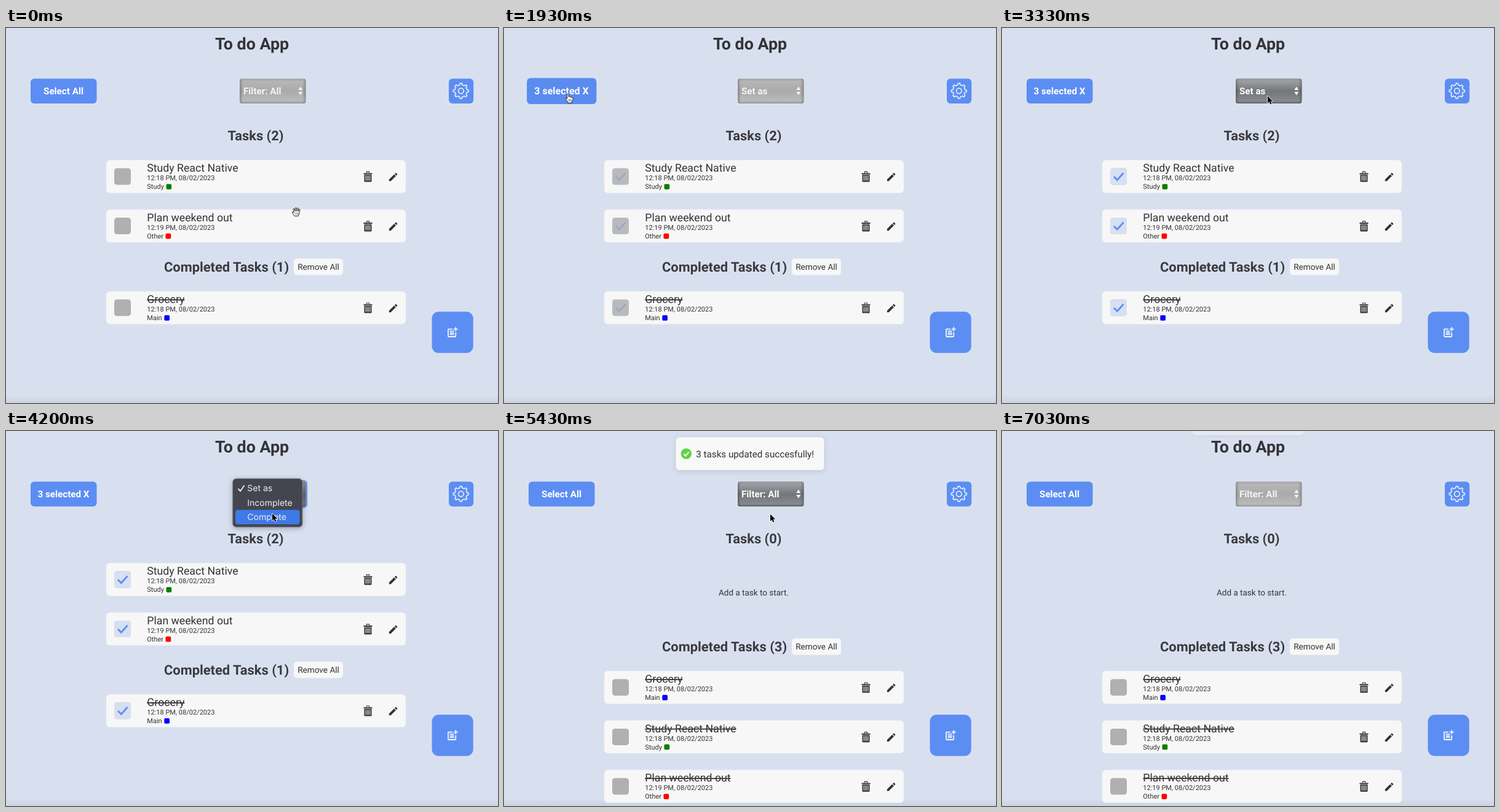
An HTML page for the animation above (7530 ms loop, 800 px wide and 611 px high).

```html
<!DOCTYPE html>
<html lang="en">
<head>
<meta charset="utf-8">
<title>To do App</title>
<style>
  html, body { margin: 0; width: 100%; height: 100%; overflow: hidden; background: #d8e0f0; }
  svg { display: block; width: 100vw; height: 100vh; }
  text { font-family: Roboto, sans-serif; fill: #333336; text-rendering: geometricPrecision; }
  .bold { font-weight: 700; }
  .heading { font-size: 21.9px; font-weight: 700; fill: #3a3a3e; }
  .mid { text-anchor: middle; }
  .name { font-size: 17.7px; }
  .small { font-size: 11px; }
  .button { font-size: 15.2px; font-weight: 700; fill: #fff; }
  .done { text-decoration: line-through; }
  .menu text { font: 14px Inter, sans-serif; fill: #ececf0; }
  .toast rect { filter: drop-shadow(0 2px 4px rgba(0, 0, 0, .12)); }
  .popup { filter: drop-shadow(0 2px 4px rgba(0, 0, 0, .3)); }
  .pointer path { stroke-linejoin: round; stroke-linecap: round; }
</style>
</head>
<body>
<svg id="stage" viewBox="0 0 800 611"></svg>
<script>
const LOOP = 7530, LAST_CHANGE = 7030;
const CLICK_ALL = 1900, LEAVE_ALL = 2585, OPEN = 3370, CHOOSE = 4570, UPDATE = 4950, TOAST_OUT = 6942;
const BLUE = '#5c8df2';

const clamp = v => Math.max(0, Math.min(1, v));
const lerp = (a, b, p) => a + (b - a) * p;
const ramp = (t, start, length) => clamp((t - start) / length);

function bezier(x1, y1, x2, y2) {
  const at = (a, b, u) => 3 * a * u * (1 - u) ** 2 + 3 * b * u * u * (1 - u) + u ** 3;
  return x => {
    if (x <= 0 || x >= 1) return clamp(x);
    let lo = 0, hi = 1;
    for (let i = 0; i < 24; i++) {
      const u = (lo + hi) / 2;
      if (at(x1, x2, u) < x) lo = u; else hi = u;
    }
    return at(y1, y2, lo);
  };
}
const ease = bezier(.25, .1, .25, 1);
const glide = bezier(.4, 0, .3, 1);
const toastIn = bezier(.21, 1.02, .73, 1);
const toastOut = bezier(.06, .71, .55, 1);
const pop = bezier(.175, .885, .32, 1.275);

// Icons
const trash = `<g transform="translate(581.5 18)" fill="#333">
  <path d="M0 3.2h14v2H0zM4.2 3V1.4Q4.2.4 5.2.4h3.6q1 0 1 1V3H8.6V1.6H5.4V3z"/>
  <path d="M1 6h12v10.4q0 1.2-1.2 1.2H2.2Q1 17.600 1 16.400z"/>
  <path d="M3.500 7.500v8M5.850 7.500v8M8.150 7.500v8M10.500 7.500v8" stroke="#f7f7f7" stroke-width="1"/></g>`;
const pencil = `<path transform="translate(620.6 18.600) scale(.75)" fill="#333"
  d="M3 17.25V21h3.75L17.81 9.94l-3.75-3.75zM20.71 7.04a1 1 0 000-1.41l-2.340-2.340a1 1 0 00-1.410 0l-1.830 1.830 3.750 3.750z"/>`;
const postAdd = `<path transform="translate(715.400 485.400) scale(.88)" fill="#fff" fill-opacity=".92"
  d="M17 19H5V7h7V5H5a2 2 0 00-2 2v12a2 2 0 002 2h12a2 2 0 002-2v-7h-2zM19 2h-2v3h-3v2h3v3h2V7h3V5h-3zM7 9h8v2H7zM7 12h8v2H7zM7 15h8v2H7z"/>`;

function gear() {
  const points = [];
  for (let i = 0; i < 8; i++) {
    for (const [turn, radius] of [[-.27, 10], [-.15, 12.5], [.15, 12.5], [.27, 10]]) {
      const a = (i + turn) * Math.PI / 4;
      points.push(`${(739.8 + radius * Math.sin(a)).toFixed(2)} ${(102.5 - radius * Math.cos(a)).toFixed(2)}`);
    }
  }
  return `<g fill="none" stroke="#e4ecfd" stroke-width="1.7" stroke-linejoin="round">
    <path d="M${points.join('L')}z"/><circle cx="739.800" cy="102.500" r="4.300"/></g>`;
}

// Page parts
const tasks = {
  study: ['Study React Native', '12:18 PM, 08/02/2023', 'Study', 'green', 260.5],
  plan: ['Plan weekend out', '12:19 PM, 08/02/2023', 'Other', 'red', 259.5],
  grocery: ['Grocery', '12:18 PM, 08/02/2023', 'Main', 'blue', 257.3]
};

function card(y, [name, time, tag, color, dotX], done) {
  return `<g transform="translate(0 ${y})">
    <rect x="163" width="487" height="53.500" rx="6" fill="#f7f7f7"/>
    <rect x="176" y="13.300" width="27" height="27" rx="4.500" fill="#b0b0b0"/>
    <g class="tick" opacity="0"><rect x="176" y="13.300" width="27" height="27" rx="4.500" fill="#d7e0f2"/>
      <path d="M182 27l5.300 5.500 10.200-11.500" fill="none" stroke="${BLUE}" stroke-width="2.800"/></g>
    <text class="name ${done ? 'done' : ''}" x="229.300" y="19">${name}</text>
    <text class="small" x="229.300" y="33.300">${time}</text>
    <text class="small" x="229.300" y="47.200">${tag}</text>
    <rect x="${dotX}" y="39" width="8.700" height="8.700" rx="1.800" fill="${color}"/>
    ${trash}${pencil}</g>`;
}

function completedHeading(y, count) {
  return `<g transform="translate(0 ${y})">
    <text class="heading" x="257" y="7.600">Completed Tasks (${count})</text>
    <rect x="468" y="-13.600" width="80" height="26.800" rx="5" fill="#f7f7f7"/>
    <text class="mid" x="508" y="4.500" font-size="13.600">Remove All</text></g>`;
}

const tasksHeading = count => `<text class="heading mid" x="406" y="183.300">Tasks (${count})</text>`;
const gradient = (id, stops, across) => `<linearGradient id="${id}" x2="${across ? 1 : 0}" y2="${across ? 0 : 1}">
  ${stops.map(([o, c, a = 1]) => `<stop offset="${o}" stop-color="${c}" stop-opacity="${a}"/>`).join('')}</linearGradient>`;
const selectBox = (fill, id = '') => `<rect ${id} x="380" y="82.500" width="107.500" height="40.500" rx="4" fill="${fill}"/>`;

document.getElementById('stage').innerHTML = `
  <defs>
    ${gradient('light', [[0, '#a2a2a2'], [.12, '#b6b6b6'], [.5, '#aaaaaa'], [.9, '#bababa'], [1, '#949494']])}
    ${gradient('dark', [[0, '#96989b'], [.12, '#9b9da0'], [.5, '#73767a'], [.9, '#85888c'], [1, '#606367']])}
    ${gradient('edges', [[0, '#000', .22], [.05, '#000', 0], [.95, '#000', 0], [1, '#000', .22]], true)}
    ${gradient('floor', [[0, '#c4cad4', 0], [1, '#c4cad4', .6]])}
  </defs>
  <rect width="800" height="611" fill="#d8e0f0"/>
  <rect y="598" width="800" height="13" fill="url(#floor)"/>
  <text class="bold mid" x="400" y="35.300" font-size="26.800" fill="#3a3a3e">To do App</text>
  <g id="all"><rect id="allBox" x="40" y="82.500" width="107.500" height="40.500" rx="6"/>
    <text id="allText" class="button mid" x="93.500" y="108"></text></g>
  <rect id="ring" x="379" y="81.300" width="109.700" height="43" rx="5" fill="none" stroke="#6797f0" stroke-width="2.800"/>
  ${selectBox('url(#light)')}${selectBox('url(#dark)', 'id="selectDark"')}${selectBox('url(#edges)')}
  <g id="selectLabel"><text id="selectText" class="button" x="386" y="108"></text>
    <path d="M475.300 101l3.500-5.500 3.500 5.500zM475.300 104l3.500 5.500 3.500-5.500z" fill="#fff"/></g>
  <rect x="720" y="82.500" width="40.200" height="40.500" rx="6" fill="${BLUE}"/>${gear()}
  <g id="before">${tasksHeading(2)}${card(215.2, tasks.study)}${card(295.8, tasks.plan)}
    ${completedHeading(389.3, 1)}${card(429, tasks.grocery, true)}</g>
  <g id="after">${tasksHeading(0)}
    <text class="mid" x="406" y="268.400" font-size="13.500">Add a task to start.</text>
    ${completedHeading(351.5, 3)}${card(391, tasks.grocery, true)}
    ${card(471.6, tasks.study, true)}${card(552.2, tasks.plan, true)}</g>
  <rect x="692.500" y="462.200" width="67.200" height="67.200" rx="11" fill="${BLUE}"/>${postAdd}
  <g id="menu" class="menu">
    <rect class="popup" x="368.800" y="77.800" width="113" height="78.500" rx="5.500" fill="#44454f" stroke="#6a6c77" stroke-width=".8"/>
    <rect id="choice" x="373" width="104.500" height="23.500" rx="4" fill="#3f79e6"/>
    <path d="M377.500 94l3.500 4 6.500-9.500" fill="none" stroke="#ececf0" stroke-width="1.900"/>
    <text x="392.300" y="98.300">Set as</text><text x="392.300" y="121.800">Incomplete</text><text x="392.300" y="145.300">Complete</text>
  </g>
  <g id="toast" class="toast">
    <rect x="279.500" y="10.200" width="241" height="53.600" rx="6" fill="#f8f8f8"/>
    <circle id="badge" cx="296.300" cy="37" r="8.700" fill="#61d345"/>
    <path id="badgeTick" d="M292.200 37.300l3 3.200 5.300-6.200" pathLength="1" stroke-dasharray="1 2" fill="none" stroke="#fff" stroke-width="1.900"/>
    <text x="312.300" y="42.600" font-size="15.200">3 tasks updated succesfully!</text>
  </g>
  <g id="pointer" class="pointer">
    <path id="arrow" d="M0 0V11.500l2.600-2.300 1.900 4.100 1.900-.900-1.800-4H8.200z" stroke="#fff" stroke-width="1.400" paint-order="stroke"/>
    <g id="hand" fill="#fff" stroke="#222" stroke-width="1">
      <path d="M-1.300 8.300V1.300q0-1.300 1.200-1.300t1.200 1.300V5q1.900-.900 2.500.600 1.800-.800 2.500.700 2.200-.400 2.200 1.500 0 3.300-1.800 5.200V15H-.300v-1.700l-3.700-4.700q-.500-1.700 1-1.600z"/>
      <path d="M1.500 9.500V12M3.500 9.500V12M5.500 9.500V12" stroke-width=".7"/></g>
    <g id="grab" fill="#fff" stroke="#222" stroke-width="1">
      <path d="M-3.200 7l-3.500-5q-.300-1.800 1.400-1.400l1.600 1.500L-5-3.500q.200-1.800 1.700-1l1.500 4-.300-5q.800-1.800 2 0l.500 5 .800-5q1.200-1.400 1.900.200L2.900 0 4-3.500q1.300-1 1.800.500L5 2.500 3.300 7z"/>
      <path d="M-1.200 2V5M.800 2V5M2.800 2V5" stroke-width=".6"/></g>
  </g>`;

const ui = {};
document.querySelectorAll('svg [id]').forEach(el => ui[el.id] = el);
const ticks = ui.before.querySelectorAll('.tick');
const set = (el, name, value) => el.setAttribute(name, value);
const show = (el, visible) => { el.style.display = visible ? '' : 'none'; };
const scaleAt = (x, y, s, dy = 0) => `translate(${x} ${y + dy}) scale(${s}) translate(${-x} ${-y})`;
const label = (el, value) => { if (el.textContent !== value) el.textContent = value; };

// Pointer stops: time, x, y
const path = [
  [0, 472, 299], [30, 472, 299], [770, 128, 137], [1000, 128, 137], [1300, 112, 114], [1600, 104, 107],
  [2330, 104, 107], [2570, 283, 157], [2620, 283, 157], [3300, 432, 111], [3770, 432, 111],
  [4150, 433, 134.5], [5870, 433, 135.5], [6500, 620, -20], [LOOP, 620, -20]
];

function pointerAt(t) {
  const i = path.findIndex(stop => stop[0] > t);
  const [t0, x0, y0] = path[i - 1], [t1, x1, y1] = path[i];
  const p = glide((t - t0) / (t1 - t0));
  return [lerp(x0, x1, p), lerp(y0, y1, p)];
}

function pointerKind(x, y, t) {
  const inside = (l, top, r, b) => x >= l && x <= r && y >= top && y <= b;
  if (inside(38, 81, 149, 124)) return 'hand';
  const overCard = inside(163, 215, 650, 269) || inside(163, 295, 650, 350);
  return overCard && t < UPDATE ? 'grab' : 'arrow';
}

function drawButtons(t) {
  const selected = t >= CLICK_ALL && t < UPDATE, updated = t >= UPDATE;
  const leave = ease(ramp(t, LEAVE_ALL, 300));
  const hover = ease(ramp(t, 1165, 300)) - leave;
  const shade = ease(ramp(t, CLICK_ALL, 300)) - leave;
  set(ui.all, 'transform', scaleAt(93.75, 102.75, 1 + .053 * hover));
  set(ui.allBox, 'fill', `rgb(${lerp(92, 70, shade)} ${lerp(141, 116, shade)} ${lerp(242, 216, shade)})`);
  label(ui.allText, selected ? '3 selected X' : 'Select All');

  const dark = ease(ramp(t, 3030, 300)) - ease(ramp(t, 5880, 300));
  set(ui.selectDark, 'opacity', dark);
  set(ui.selectLabel, 'opacity', .87 + .13 * dark);
  label(ui.selectText, selected ? 'Set as' : 'Filter: All');
  show(ui.ring, t >= OPEN && !updated);

  ticks.forEach(el => set(el, 'opacity', ramp(t, CLICK_ALL, 150)));
  show(ui.before, !updated);
  show(ui.after, updated);
}

function drawMenu(t, y) {
  show(ui.menu, t >= OPEN && t < CHOOSE + 310);
  set(ui.menu, 'opacity', 1 - ramp(t, CHOOSE + 130, 180));
  set(ui.choice, 'y', y > 128 ? 128.6 : 105.1);
  show(ui.choice, t < CHOOSE || t >= CHOOSE + 70);
}

function drawToast(t) {
  const enter = toastIn(ramp(t, UPDATE, 350)), exit = toastOut(ramp(t, TOAST_OUT, 400));
  show(ui.toast, t >= UPDATE);
  set(ui.toast, 'transform', scaleAt(400, 37, .6 + .4 * (enter - exit), -108 * (1 - enter) - 81 * exit));
  set(ui.toast, 'opacity', (.5 + .5 * enter) * (1 - exit));
  set(ui.badge, 'transform', scaleAt(296.3, 37, pop(ramp(t, UPDATE + 130, 300))));
  const drawn = ramp(t, UPDATE + 260, 200);
  show(ui.badgeTick, drawn > 0);
  set(ui.badgeTick, 'stroke-dashoffset', 1 - drawn);
}

function render(time) {
  const t = Math.min(time % LOOP, LAST_CHANGE);
  const [x, y] = pointerAt(t);
  drawButtons(t);
  drawMenu(t, y);
  drawToast(t);
  set(ui.pointer, 'transform', `translate(${x} ${y})`);
  const kind = pointerKind(x, y, t);
  for (const name of ['arrow', 'hand', 'grab']) show(ui[name], name === kind);
}

const start = performance.now();
function tick() {
  render(performance.now() - start);
  requestAnimationFrame(tick);
}
tick();
</script>
</body>
</html>
```
